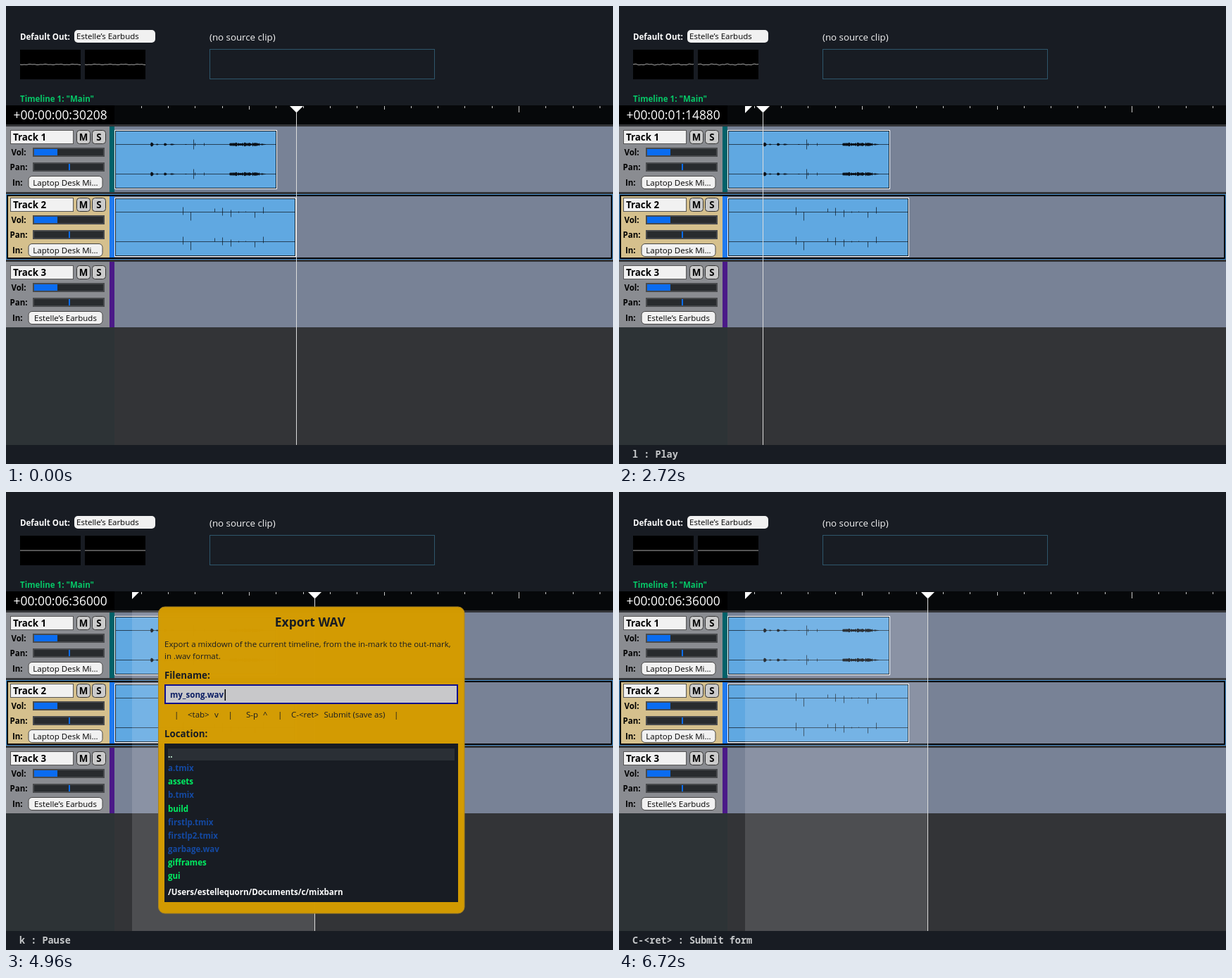
Recreate the animation shown at these times as an HTML page. Size 862x650 px, loop 8160 ms.

```html
<!DOCTYPE html>
<html lang="en">
<head>
<meta charset="utf-8">
<title>Audio timeline</title>
<style>
  html, body { margin: 0; width: 100%; height: 100%; overflow: hidden; background: #181c23; }
  svg { display: block; width: 100%; height: 100%; }
  text { font-family: "Open Sans", "Noto Sans", sans-serif; font-size: 11.5px; white-space: pre; }
  .b { font-weight: 700; }
  .m { font-size: 13.3px; }
  .l { font-size: 17.4px; }
  .key { font: 700 13.5px "Noto Sans Mono", "DejaVu Sans Mono", monospace; }
</style>
</head>
<body>
<svg id="stage" viewBox="0 0 862 650" xmlns="http://www.w3.org/2000/svg"></svg>
<script>
const LOOP = 8160, STEP = 160, ZERO = 154, SECOND = 38.3, RATE = 48000;
const BG = '#181c23', NAVY = '#10108c', BLUE = '#0a6cf0', GREEN = '#00ee62', FILE = '#1449a2';
const OUT = 'Estelle’s Earbuds', MIC = 'Laptop Desk Mi...';
const HOME = '/Users/estellequorn/Documents';
const stage = document.getElementById('stage');

function add(tag, attrs, parent = stage) {
  const el = document.createElementNS('http://www.w3.org/2000/svg', tag);
  for (const name in attrs) el.setAttribute(name, attrs[name]);
  return parent.appendChild(el);
}
const group = parent => add('g', {}, parent);
const rect = (x, y, width, height, fill, more = {}, parent) =>
  add('rect', { x, y, width, height, fill, ...more }, parent);
const path = (d, more, parent) => add('path', { d, fill: 'none', ...more }, parent);
function label(str, x, y, cls = '', fill = '#000', parent, anchor = 'start') {
  const el = add('text', { x, y, class: cls, fill, 'text-anchor': anchor }, parent);
  el.textContent = str;
  return el;
}
const show = (el, on) => el.setAttribute('visibility', on ? 'visible' : 'hidden');

// Header
label('Default Out:', 20, 48, 'b', '#fff');
rect(97, 34, 115, 18, '#f1f1f1', { rx: 5 });
label(OUT, 100, 47);
label('(no source clip)', 289, 49, 'm', '#f4f4f4');
rect(289.5, 61.5, 319, 42, 'none', { stroke: '#2e566b' });
const meters = [20, 112].map(x => {
  rect(x, 62, 86, 42, '#000');
  return { x, line: path('', { stroke: '#a8a8a8' }) };
});
label('Timeline 1: "Main"', 20, 136, 'b', '#06c767');

// Timeline backdrop and ruler
rect(0, 141, 862, 482, '#333437');
rect(0, 456, 154, 167, '#2d3336');
rect(0, 141, 862, 27, '#06080a');
rect(0, 141, 154, 27, '#000');
for (let i = 1; i < 19; i++) {
  const len = i % 15 === 0 ? 9 : i % 5 === 0 ? 5 : 3;
  rect(Math.floor(ZERO + i * SECOND), 142, 1, len, '#c8c8c8');
}
const clock = label('', 10.5, 161, 'l', '#fff');

let track;
function toggle(char, x) {
  rect(x + .5, 176.5, 19, 19, '#cbcbcb', { rx: 4, stroke: '#333' }, track);
  label(char, x + 10, 191, 'b m', '#000', track, 'middle');
}
function slider(name, y, x, width) {
  label(name, 18, y + 10.5, 'b', '#000', track, 'middle');
  rect(39, y + 1, 100, 11, '#282b2e', { stroke: '#484a4d', 'stroke-width': 2 }, track);
  rect(x, y + 2, width, 9, BLUE, {}, track);
}
function addTrack(i, panel, bar, input) {
  track = add('g', { transform: `translate(0 ${i * 96})` });
  rect(0, 171, 862, 93, '#788296', {}, track);
  rect(0, 171, 147, 93, panel, {}, track);
  rect(147, 171, 7, 93, bar, {}, track);
  rect(6.5, 176.5, 89, 19, '#f1f1f1', { stroke: '#555' }, track);
  label('Track ' + (i + 1), 10, 191, 'b m', '#000', track);
  toggle('M', 100);
  toggle('S', 122);
  slider('Vol:', 201, 40, 33);
  slider('Pan:', 222, 89, 2);
  label('In:', 16.3, 255, 'b', '#000', track, 'middle');
  rect(32, 241.5, 105, 18, '#f1f1f1', { rx: 5, stroke: '#444' }, track);
  label(input, 84.5, 255, '', '#000', track, 'middle');
}
addTrack(0, '#8a8c91', '#006169', MIC);
addTrack(1, '#d5c08d', '#2079ee', MIC);
addTrack(2, '#8a8c91', '#4b1a88', OUT);

// Selection frame of the second track
rect(.5, 267.5, 861, 92, 'none', { stroke: '#4a93d0' });
rect(2, 269, 858, 89, 'none', { stroke: '#000', 'stroke-width': 2 });

function clip(y, width) {
  rect(154.5, y + .5, width, 83, 'none', { stroke: '#fff' });
  rect(155.5, y + 1.5, width - 2, 81, '#60a8e1', { stroke: '#15202a' });
}
clip(176, 230);
clip(272, 257);

// Blobs are [start, end, height]; spikes are [x, up, down]
const blobs = [[205, 210, 4], [213, 217, 1.3], [224, 229, 2.8], [233, 240, 1.2], [254, 257, .8]];
const spikes = [[266.5, 7, 7], [268.5, 2, 2], [281.5, 2, 2]];
const taps = [[251.5, 7, 4], [262.5, 0, 12], [296.5, 5, 0], [307.5, 6, 5], [319.5, 3, 7],
  [330.5, 1, 1], [340.5, 1, 0], [353.5, 0, 8], [365.5, 7, 2]];
const bars = (list, y) => list.map(([x, up, down]) => `M${x} ${y - up}V${y + down}`).join('');
const INK = '#0b1118', THIN = { stroke: INK, 'stroke-opacity': .68 };

for (const y of [196.5, 238.5]) {
  path(`M156 ${y}H384`, THIN);
  for (const [a, b, h] of blobs)
    path(`M${a} ${y}Q${a + 1} ${y - h * 1.5} ${b} ${y}Q${a + 1} ${y + h * 1.5} ${a} ${y}`, { fill: INK });
  path(bars(spikes, y), THIN);
  let buzz = '';
  for (let x = 317.5; x < 369; x++) {
    const h = Math.min(1, (x - 315) / 3, (372 - x) / 18) * (1.9 + .8 * Math.sin(x * x));
    buzz += `M${x} ${y - h}V${y + h}`;
  }
  path(buzz, { stroke: INK });
}
for (const y of [292.5, 334.5]) {
  path(`M156 ${y}H411`, THIN);
  path(bars(taps, y), THIN);
}

// Marks, shaded range, playhead
const range = rect(179, 168, 260, 455, '#fff', { opacity: .13 });
const inMark = path('M179 142H189L179 152Z', { fill: '#fff' });
const head = group();
path('M-9.5 142H9.5L0 151.5Z', { fill: '#fff' }, head);
path('M0 150V623', { stroke: '#dcdcdc' }, head);

const hint = label('', 19, 641, 'key', '#c6c8ca');

// Export dialog
const dialog = group();
rect(216.5, 163, 434.5, 435, '#d59c00', { rx: 9, stroke: '#a9831f', 'fill-opacity': .985 }, dialog);
const say = (str, x, y, cls, fill = BG, anchor) => label(str, x, y, cls, fill, dialog, anchor);
say('Export WAV', 432, 190.5, 'b l', BG, 'middle');
say('Export a mixdown of the current timeline, from the in-mark to the out-mark,', 225, 219.5);
say('in .wav format.', 225, 236.5);
say('Filename:', 225, 265, 'b m');
rect(225, 273, 417, 28, '#c8c8ca', {}, dialog);
const nameFocus = group(dialog);
rect(226, 274, 415, 26, 'none', { stroke: NAVY, 'stroke-width': 2 }, nameFocus);
rect(310.5, 280, 1.5, 16, '#000', {}, nameFocus);
say('my_song.wav', 233, 292, 'b', '#0b1d63');
for (const x of [239, 315.5, 386, 551]) say('|', x, 320);
[['<tab>', 258], ['v', 296], ['S-p', 341], ['^', 365], ['C-<ret>', 405], ['Submit (save as)', 451.5]]
  .forEach(([str, x]) => say(str, x, 320));
say('Location:', 225, 348, 'b m');
rect(225, 357, 417, 225, BG, {}, dialog);
const listFocus = rect(226, 358, 415, 223, 'none', { stroke: NAVY, 'stroke-width': 2 }, dialog);
rect(230, 364, 407, 17, '#2a2f35', {}, dialog);
const rows = Array.from({ length: 10 }, (_, i) => say('', 230, 377 + i * 19.15, 'b'));
const place = say('', 230, 571.5, 'b', '#fff');

const folders = [
  { path: HOME + '/c/mixbarn',
    items: 'a.tmix assets b.tmix build firstlp.tmix firstlp2.tmix garbage.wav gifframes gui' },
  { path: HOME + '/c',
    items: 'basics drawing exercises lists mixbarn parser sketches sorting tests' },
  { path: HOME,
    items: 'Lp Loops velorian_lux ways_to_market backup_auth bashtests c tilesums estelle-quorn.test' }
];
function openFolder(folder) {
  ['..', ...folder.items.split(' ')].forEach((name, i) => {
    rows[i].textContent = name;
    rows[i].setAttribute('fill', i === 0 ? '#c9f5d8' : /\.(tmix|wav)$/.test(name) ? FILE : GREEN);
  });
  place.textContent = folder.path;
}

// Start times of the key hints
const hints = [[0, ''], [320, 'j : Rewind'], [2080, 'k : Pause'], [2560, 'l : Play'], [4160, 'k : Pause'],
  [5280, '<tab> : Go to next item'], [5600, '<ret> : Select item'], [6720, 'C-<ret> : Submit form']];
const current = (table, t) => table.filter(([start]) => start <= t).pop()[1];

// Playhead position in seconds; speeds are per millisecond of the loop
const START = 6.75933, MARK = .63, LEFT = 30208 / RATE, REWIND = .677 / STEP, PLAY = .68 / STEP;
function position(t) {
  if (t < 2080) return START - Math.max(0, t - 640) * REWIND;
  return MARK + Math.min(Math.max(0, t - 2560), 1600) * PLAY;
}
function shownTime(t) {
  if (t < 640 || (t >= 2080 && t < 2560)) return LEFT;
  return t >= 4000 ? 6.75 : position(t);
}
function timecode(sec) {
  const n = Math.round(sec * RATE);
  const pad = (v, len) => String(v).padStart(len, '0');
  return '+00:00:' + pad(Math.floor(n / RATE), 2) + ':' + pad(n % RATE, 5);
}
function level(t) {
  if (t >= 4160) return 0;
  const p = position(t);
  if (t < 640) return .6;
  return p > 4.3 && p < 5.6 ? 2.4 : Math.abs(p - 1.31) < .3 ? 1 : .35;
}
function drawMeters(t) {
  const amp = level(t), seed = t / STEP;
  for (const { x, line } of meters) {
    let d = '';
    for (let i = 0; i <= 86; i += 2) {
      const y = 83 + amp * (Math.sin(i * .31 + seed) * .55 + Math.sin(i * .83 + seed * 2.3) * .45);
      d += (i ? 'L' : 'M') + (x + i) + ' ' + y.toFixed(2);
    }
    line.setAttribute('d', d);
  }
}

function render(t) {
  const x = Math.floor(ZERO + position(t) * SECOND) + .5;
  head.setAttribute('transform', `translate(${x} 0)`);
  clock.textContent = timecode(shownTime(t));
  hint.textContent = current(hints, t);
  drawMeters(t);
  show(inMark, t >= 2080);
  show(range, t >= 4160);
  const open = t >= 4960 && t < 6720;
  show(dialog, open);
  show(nameFocus, open && t < 5280);
  show(listFocus, open && t >= 5280);
  openFolder(folders[t < 5600 ? 0 : t < 5920 ? 1 : 2]);
}

const began = performance.now();
let last = -1;
function tick() {
  const t = Math.floor((performance.now() - began) % LOOP / STEP) * STEP;
  if (t !== last) render(last = t);
  requestAnimationFrame(tick);
}
tick();
</script>
</body>
</html>
```
